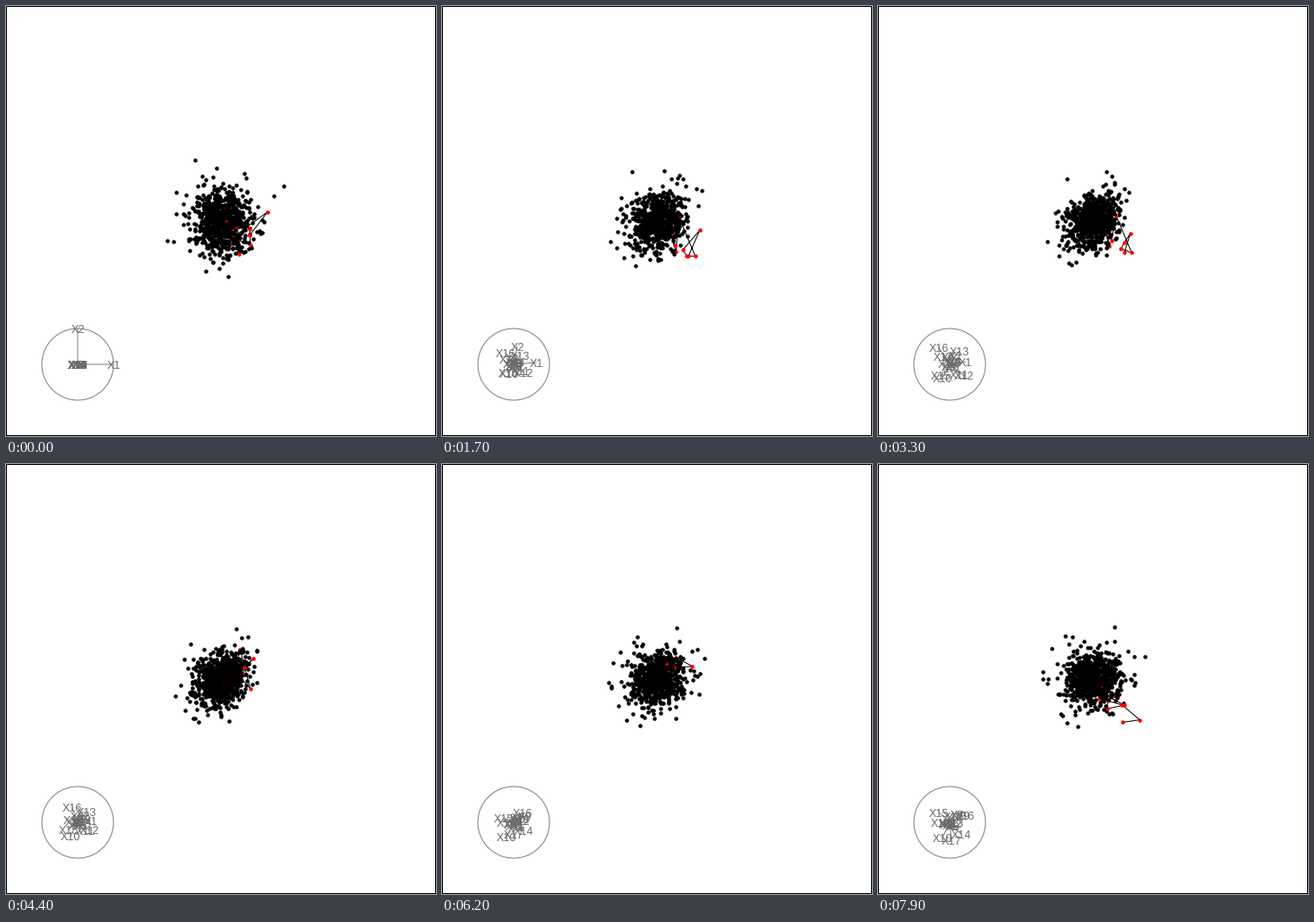
Recreate the animation shown at these times as a matplotlib script. Size 480 px wide and 480 px high, loop 8000 ms.

```python
import numpy as np
import matplotlib.pyplot as plt
from matplotlib.animation import FuncAnimation
from matplotlib.patches import Circle, Rectangle

SIZE, DPI = 480, 80
PX = 72 / DPI
FRAMES, STEP = 80, 100
DIMS, COUNT, LINKED = 18, 720, 14
HUB = np.array([80, 400])
HOME = np.array([240, 240])

rng = np.random.default_rng(12)

# Planes of the tour: pixel offsets of the leading axis tips at each stop.
STOPS = (0, 28, 79)
PLANES = [
    {1: (40, 0), 2: (0, -40)},
    {1: (18, -3), 2: (6, -10), 10: (-8, 15), 11: (11, 11), 12: (16, 13),
     13: (11, -15), 15: (-10, 13), 16: (-13, -19)},
    {7: (8, -9), 9: (15, -8), 10: (-8, 17), 14: (13, 13), 15: (-12, -11),
     16: (17, -8), 17: (2, 20), 18: (-10, 0)},
]
SPREADS = np.array([(17, 18.5, -0.05), (14.5, 15.5, 0.33), (16, 15.5, 0.06)])

# Stray points around the cloud, one row of offsets per stop.
STRAYS = np.array([
    [(-29, -68), (70, -39), (-53, 23), (-5, -59), (-17, 56)],
    [(-28, -48), (40, -32), (-51, 23), (15, -55), (-27, 47)],
    [(-56, -8), (39, -31), (-51, 5), (24, -58), (-17, 53)],
])

# The linked chain leans out of the cloud in a turning direction.
LEAN_STOPS = (0, 26, 55, 79)
LEANS = np.array([(23, 5), (25, 23), (15, -23), (25, 22)])


def plane_tips(plane, noise):
    tips = rng.normal(0, noise, (DIMS, 2))
    for axis, tip in plane.items():
        tips[axis - 1] = tip
    return tips


def ease(keys, stops, t):
    """Cosine easing from stop to stop."""
    i = min(np.searchsorted(stops, t, side="right"), len(stops) - 1) - 1
    u = (t - stops[i]) / (stops[i + 1] - stops[i])
    return keys[i] + (keys[i + 1] - keys[i]) * (1 - np.cos(np.pi * u)) / 2


def orthonormal(tips):
    a, b = tips[:, 0], -tips[:, 1]
    a = a / np.linalg.norm(a)
    b = b - a * (a @ b)
    return np.column_stack([a, b / np.linalg.norm(b)])


def project(points, basis, spread):
    """Project on the tour plane, then scale and tilt to pixel offsets."""
    u, v = (points @ basis).T
    sx, sy, rho = spread
    return np.column_stack([sx * u, -sy * (rho * u + np.sqrt(1 - rho ** 2) * v)])


tips = np.array([plane_tips(p, n) for p, n in zip(PLANES, (0, 5, 5))])
cloud = rng.normal(size=(COUNT, DIMS))
wander = rng.normal(0, 0.6, (LINKED, DIMS))
reach = np.linspace(0.1, 1.7, LINKED)[:, None]

fig = plt.figure(figsize=(SIZE / DPI, SIZE / DPI), dpi=DPI, facecolor="white")
ax = fig.add_axes([0, 0, 1, 1])
ax.set(xlim=(0, SIZE), ylim=(SIZE, 0))
ax.axis("off")
# Half of the border's width falls outside the stage.
ax.add_patch(Rectangle((0, 0), SIZE, SIZE, fill=False, ec="black", lw=2 * PX))
ax.add_patch(Circle(HUB, 40, fill=False, ec="#808080", lw=PX))


def dots(color, z):
    return ax.plot([], [], "o", color=color, ms=4.5 * PX, mew=0, zorder=z)[0]


link, = ax.plot([], [], color="black", lw=PX, zorder=2)
under, red, over = dots("black", 3), dots("red", 4), dots("black", 5)
rays = [ax.plot([], [], color="#808080", lw=PX, snap=False)[0] for _ in range(DIMS)]
tags = [ax.text(0, 0, f"X{n + 1}", color="#6a6a6a", ha="center", va="baseline",
                family="Liberation Sans", size=12.5 * PX) for n in range(DIMS)]


def draw(f):
    tip = ease(tips, STOPS, f)
    basis, spread = orthonormal(tip), ease(SPREADS, STOPS, f)
    xy = HOME + project(cloud, basis, spread)
    strays = HOME + ease(STRAYS, STOPS, f)
    chain = HOME + reach * ease(LEANS, LEAN_STOPS, f) + project(wander, basis, spread)
    under.set_data(*np.vstack([xy[::2], strays]).T)
    over.set_data(*xy[1::2].T)
    red.set_data(*chain.T)
    link.set_data(*chain.T)
    for ray, tag, (x, y) in zip(rays, tags, tip + HUB):
        ray.set_data([HUB[0], x], [HUB[1], y])
        tag.set_position((x, y + 4.9))
    return [link, under, red, over, *rays, *tags]


anim = FuncAnimation(fig, draw, frames=FRAMES, interval=STEP, repeat=True, repeat_delay=0)
plt.show()
```
